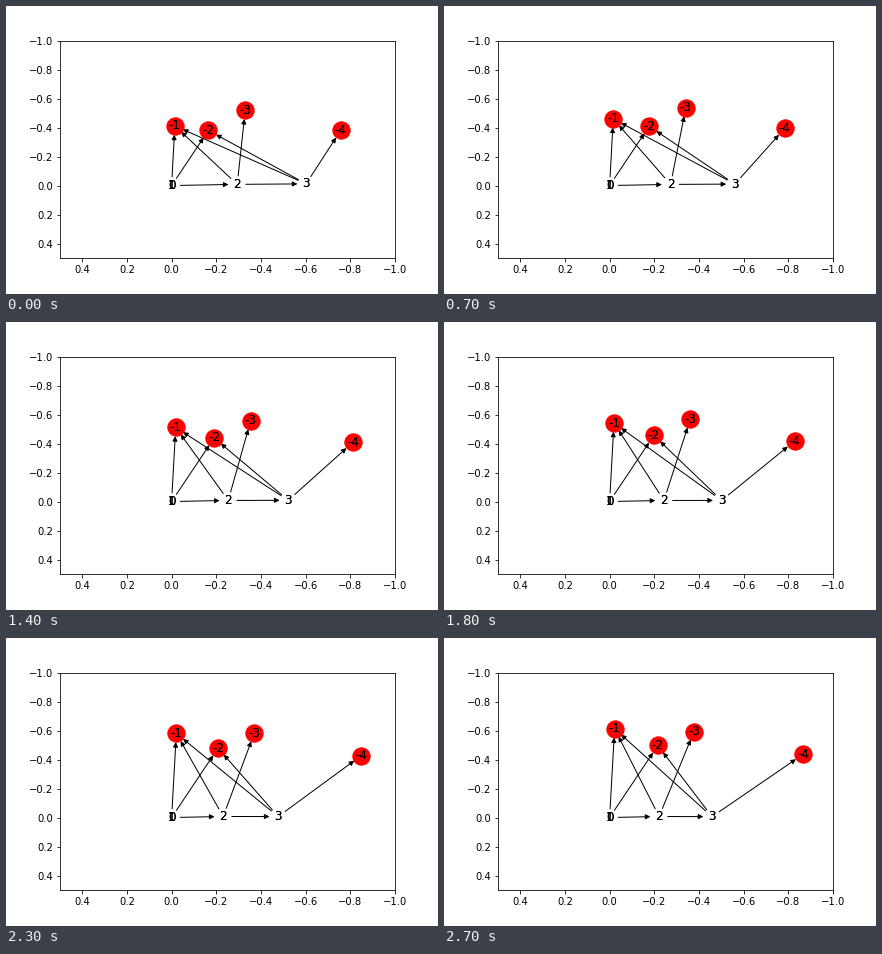
These frames come from a looping animation (432x288 px, 2800 ms). A matplotlib script:

```python
import numpy as np
import matplotlib.pyplot as plt
from matplotlib.animation import FuncAnimation
from matplotlib.patches import FancyArrowPatch

plt.rcParams["font.family"] = "DejaVu Sans"
FRAMES, INTERVAL = 28, 100
NODE_SIZE = 300
MARGIN = np.sqrt(NODE_SIZE) / 2

# Poses count up from 0, landmarks down from -1; each glides start -> end.
START = {0: (0, 0), 1: (0, 0), 2: (-.294, -.008), 3: (-.6026, -.0115),
         -1: (-.0145, -.411), -2: (-.165, -.38),
         -3: (-.33, -.519), -4: (-.758, -.381)}
END = {0: (0, 0), 1: (0, 0), 2: (-.2218, -.007), 3: (-.4588, -.006),
       -1: (-.0225, -.612), -2: (-.216, -.497),
       -3: (-.378, -.593), -4: (-.867, -.436)}
EDGES = [(0, -1), (0, -2), (1, 2), (2, -1), (2, -3), (2, 3),
         (3, -1), (3, -2), (3, -4)]
LANDMARKS = [n for n in START if n < 0]


def position(node, frame):
    """Poses slow down a little, landmarks speed up a little."""
    u = frame / (FRAMES - 1)
    bend = -.08 if node < 0 else .15
    u += bend * u * (1 - u)
    return (1 - u) * np.array(START[node]) + u * np.array(END[node])


def make_arrow():
    arrow = FancyArrowPatch((0, 0), (1, 1), arrowstyle="-|>",
                            mutation_scale=10, shrinkA=MARGIN,
                            shrinkB=MARGIN, color="k", linewidth=1, zorder=1)
    return ax.add_patch(arrow)


def make_label(node):
    return ax.text(0, 0, str(node), size=12, ha="center", va="center",
                   zorder=3)


fig, ax = plt.subplots(figsize=(6, 4), dpi=72)
fig.subplots_adjust(left=.125, right=.9, bottom=.125, top=.88)
ax.set(xlim=(.5, -1), ylim=(.5, -1))

arrows = [make_arrow() for _ in EDGES]
zeros = np.zeros(len(LANDMARKS))
dots = ax.scatter(zeros, zeros, s=NODE_SIZE, c="red", zorder=2)
# Labels are laid down twice, which makes their edges heavier.
labels = [(n, make_label(n)) for _ in range(2) for n in START]


def update(frame):
    pos = {n: position(n, frame) for n in START}
    for arrow, (a, b) in zip(arrows, EDGES):
        arrow.set_positions(pos[a], pos[b])
    dots.set_offsets([pos[n] for n in LANDMARKS])
    for n, label in labels:
        label.set_position(pos[n])
    return [*arrows, dots, *(label for _, label in labels)]


anim = FuncAnimation(fig, update, frames=FRAMES, interval=INTERVAL,
                     repeat=True, repeat_delay=0)
plt.show()
```
